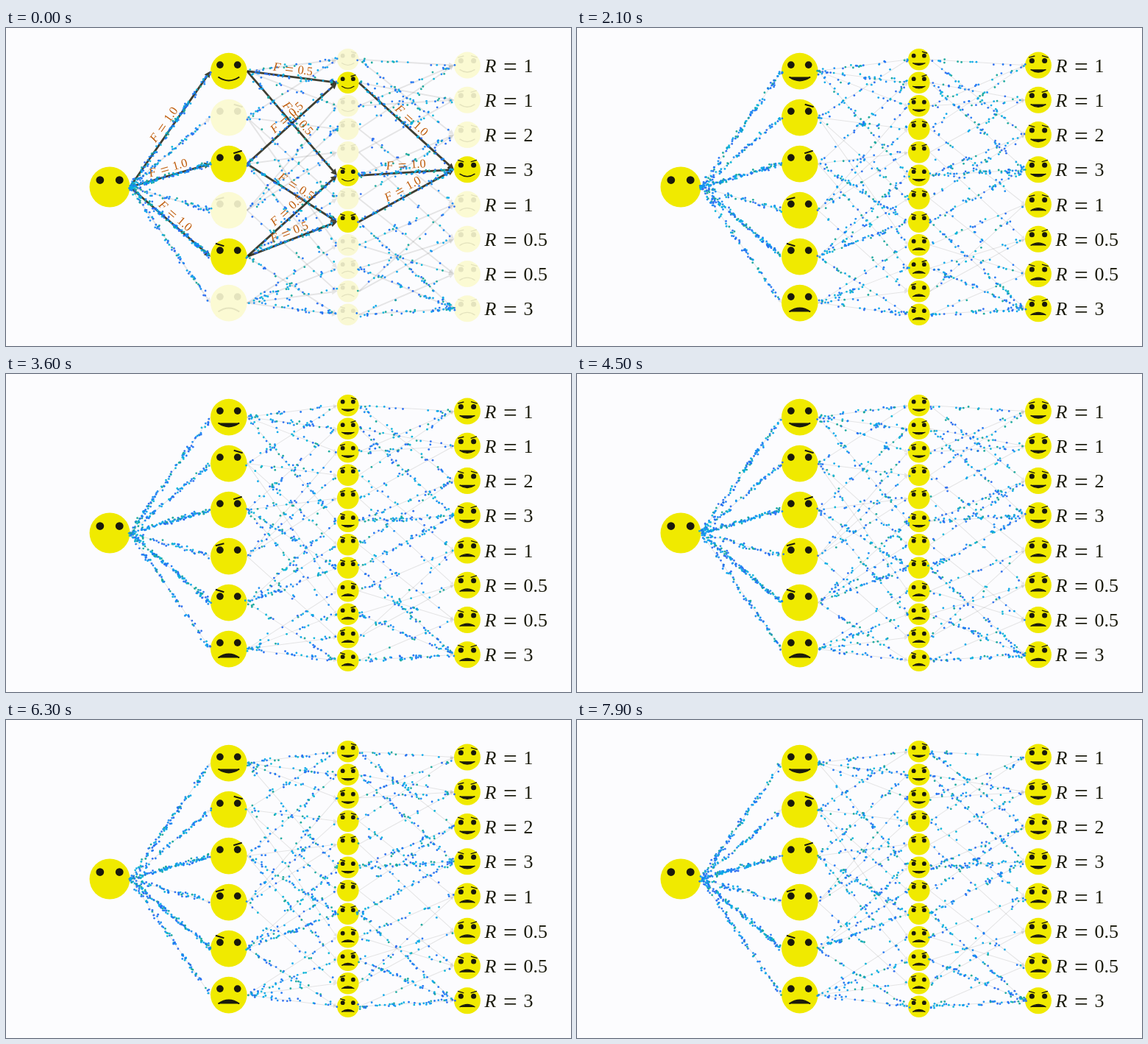
These frames come from a looping animation (768x432 px, 8000 ms). An HTML page with a canvas:

```html
<!DOCTYPE html>
<html>
<head>
<meta charset="utf-8">
<style>
  html, body { margin: 0; width: 100%; height: 100%; overflow: hidden; background: #fcfcfe; }
  canvas { display: block; }
</style>
</head>
<body>
<canvas id="stage" width="768" height="432"></canvas>
<script>
const ctx = document.getElementById('stage').getContext('2d');
const LOOP = 8000, STEP = 100, FADE = 1000, DIM = 0.17;
const YELLOW = '#f0ea00', INK = '#1a1a0c', ORANGE = '#bf5c0a';
const DOT_COLORS = ['#1f74f4', '#2a6cf0', '#1a8cf2', '#08a6ea', '#08b4d8', '#16a89c'];
const DOTS_PER_FLOW = 42;
const FONT = '"Liberation Serif", "Times New Roman", serif';

let seed = 7;
function rand() {
  seed = (seed * 16807) % 2147483647;
  return seed / 2147483647;
}

// Features: S smile, F frown; right brow d/u; left brow U/D (rising or falling).
const layers = [
  { x: 141, y: 216, gap: 0, r: 27.5, faces: [''], lit: [0] },
  { x: 302.8, y: 58.6, gap: 63, r: 24.8, faces: ['S', 'd', 'u', 'U', 'D', 'F'], lit: [0, 2, 4] },
  { x: 464.8, y: 42.8, gap: 31.5, r: 14.8, lit: [1, 5, 7],
    faces: ['Sd', 'Su', 'SU', 'dU', 'uU', 'SD', 'dD', 'uD', 'Fd', 'Fu', 'FU', 'FD'] },
  { x: 627, y: 50.6, gap: 47.25, r: 18, lit: [3],
    faces: ['SdU', 'SuU', 'SdD', 'SuD', 'FdU', 'FuU', 'FdD', 'FuD'] }
];
const rewards = [1, 1, 2, 3, 1, 0.5, 0.5, 3];

for (const layer of layers) {
  layer.nodes = layer.faces.map((face, i) => ({
    face, x: layer.x, y: layer.y + i * layer.gap, r: layer.r,
    lit: layer.lit.includes(i), flow: 0
  }));
}
layers[3].nodes.forEach((n, i) => n.flow = rewards[i]);

// Every node shares its flow equally among the parents it extends by one feature.
const edges = [];
for (let k = 3; k > 0; k--) {
  for (const b of layers[k].nodes) {
    for (const a of layers[k - 1].nodes) {
      if (![...a.face].every(c => b.face.includes(c))) continue;
      const flow = b.flow / k;
      a.flow += flow;
      edges.push({ x1: a.x + a.r, y1: a.y, x2: b.x - b.r, y2: b.y, flow,
        lit: a.lit && b.lit, label: k === 2 ? '0.5' : '1.0' });
    }
  }
}

const jitter = () => (rand() + rand() - 1) * 3.8;
const dots = edges.flatMap(edge =>
  Array.from({ length: Math.round(edge.flow * DOTS_PER_FLOW) }, () => ({
    edge, phase: rand(), time: 1700 + rand() * 800, dx: jitter(), dy: jitter(),
    color: DOT_COLORS[Math.floor(rand() * DOT_COLORS.length)]
  })));

function smooth(t) {
  const sig = x => 1 / (1 + Math.exp(-x)), e = sig(-5);
  return Math.min(1, Math.max(0, (sig(10 * (t - 0.5)) - e) / (1 - 2 * e)));
}

function disc(x, y, r) {
  ctx.beginPath();
  ctx.arc(x, y, r, 0, 2 * Math.PI);
  ctx.fill();
}

function line(x1, y1, x2, y2) {
  ctx.beginPath();
  ctx.moveTo(x1, y1);
  ctx.lineTo(x2, y2);
  ctx.stroke();
}

function formula(name, value, x, y, size) {
  const put = (text, dx, dy, style, scale) => {
    ctx.font = `${style} ${size * scale}px ${FONT}`;
    ctx.fillText(text, x + dx * size, y + dy * size);
  };
  put(name, 0, 0, 'italic', 1);
  put('=', 0.98, 0.15, 'normal', 1.28);
  put(value, 2.04, 0, 'normal', 1);
}

function drawArrow(e, width, head) {
  const len = Math.hypot(e.x2 - e.x1, e.y2 - e.y1);
  ctx.save();
  ctx.translate(e.x1, e.y1);
  ctx.rotate(Math.atan2(e.y2 - e.y1, e.x2 - e.x1));
  ctx.strokeStyle = ctx.fillStyle = INK;
  ctx.lineWidth = width;
  line(0, 0, len - head, 0);
  ctx.beginPath();
  ctx.moveTo(len, 0);
  ctx.lineTo(len - head, -head / 2);
  ctx.lineTo(len - head, head / 2);
  ctx.fill();
  ctx.restore();
}

function drawLabel(e) {
  ctx.save();
  ctx.translate((e.x1 + e.x2) / 2, (e.y1 + e.y2) / 2);
  ctx.rotate(Math.atan2(e.y2 - e.y1, e.x2 - e.x1));
  ctx.fillStyle = ORANGE;
  formula('F', e.label, -27, -5.5, 16.4);
  ctx.restore();
}

function drawFace(n, shown) {
  const alpha = n.lit ? 1 : DIM + (1 - DIM) * shown;
  const has = c => n.face.includes(c);
  const s = n.r / 25;
  ctx.save();
  ctx.translate(n.x, n.y);
  ctx.scale(s, s);
  ctx.globalAlpha = alpha;
  ctx.fillStyle = YELLOW;
  disc(0, 0, 25);
  ctx.globalAlpha = n.lit ? 1 : alpha * (0.6 + 0.4 * shown);
  ctx.fillStyle = ctx.strokeStyle = INK;
  ctx.lineWidth = Math.max(2, 1.4 / s);
  disc(-12, -8.6, 4.9);
  disc(12, -8.6, 4.9);
  if (has('d')) line(7, -18, 19, -14.5);
  if (has('u')) line(6.5, -14.5, 18, -18);
  if (has('U')) line(-18, -14.5, -6.5, -17.5);
  if (has('D')) line(-18, -18, -6.5, -14.5);
  if (has('S') || has('F')) {
    const [edge, bend] = has('S') ? [8, 18] : [12, 2];
    ctx.beginPath();
    ctx.moveTo(-14.5, edge);
    ctx.quadraticCurveTo(0, bend, 14.5, edge);
    ctx.lineWidth = 2;
    ctx.stroke();
    ctx.globalAlpha = alpha * shown;
    ctx.fill();
  }
  ctx.restore();
}

function draw(t) {
  const shown = smooth(t / FADE);
  ctx.globalAlpha = 1;
  ctx.fillStyle = '#fcfcfe';
  ctx.fillRect(0, 0, 768, 432);

  ctx.globalAlpha = 0.1;
  for (const e of edges) drawArrow(e, 1.9 - 0.9 * shown, 7 - 2 * shown);
  ctx.globalAlpha = 0.82 * (1 - shown);
  const lit = edges.filter(e => e.lit);
  for (const e of lit) drawArrow(e, 2.8, 8.5);

  for (const layer of layers) for (const n of layer.nodes) drawFace(n, shown);

  ctx.globalAlpha = 0.95;
  for (const d of dots) {
    const p = (d.phase + t / d.time) % 1, e = d.edge;
    ctx.fillStyle = d.color;
    disc(e.x1 + (e.x2 - e.x1) * p + d.dx, e.y1 + (e.y2 - e.y1) * p + d.dy, 1.4);
  }

  ctx.globalAlpha = 1 - shown;
  lit.forEach(drawLabel);
  ctx.globalAlpha = 1;
  ctx.fillStyle = INK;
  layers[3].nodes.forEach((n, i) => formula('R', String(rewards[i]), 650.5, n.y + 9, 26));
}

const start = performance.now();
function tick() {
  const t = (performance.now() - start) % LOOP;
  draw(Math.floor(t / STEP) * STEP);
  requestAnimationFrame(tick);
}
tick();
</script>
</body>
</html>
```
